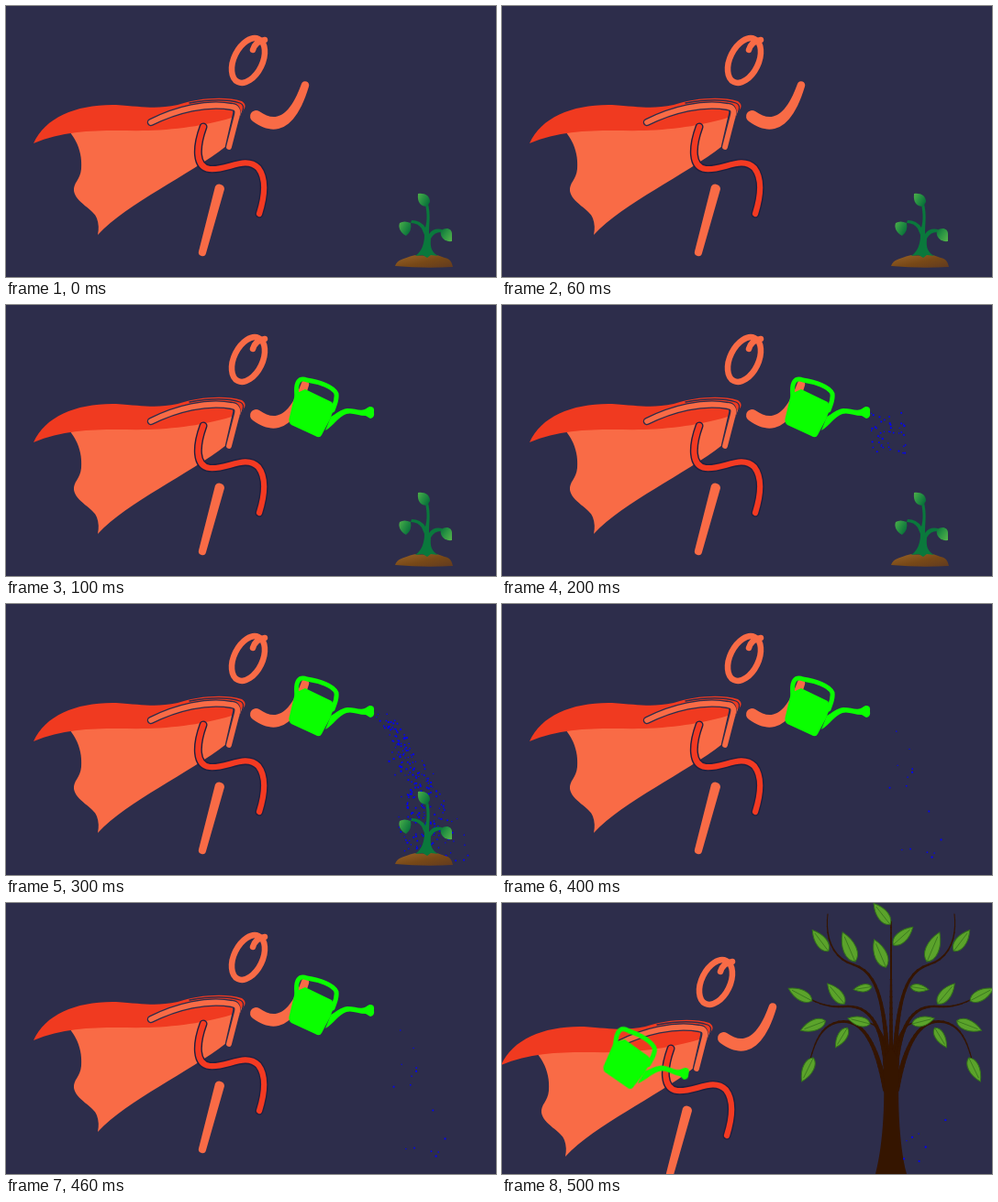
Recreate the animation shown at these times as an HTML page. Size 534x296 px, loop 0.6 s.

```html
<!DOCTYPE html>
<html lang="en">
<head>
<meta charset="utf-8">
<title>Watering hero</title>
<style>
  html, body { margin: 0; width: 100%; height: 100%; overflow: hidden; background: #2d2d4b; }
  svg { display: block; width: 100vw; height: 100vh; }
  .line { fill: none; stroke-linecap: round; stroke-linejoin: round; }
</style>
</head>
<body>
<svg viewBox="0 0 534 296">
  <defs>
    <linearGradient id="soil" x1="0" y1="0" x2="1" y2="1">
      <stop offset="0" stop-color="#9a6428"/><stop offset=".55" stop-color="#774817"/><stop offset="1" stop-color="#603a20"/>
    </linearGradient>
    <linearGradient id="blade" x1="0" y1="0" x2="1" y2=".6">
      <stop offset="0" stop-color="#50b04a"/><stop offset=".45" stop-color="#2a9443"/><stop offset="1" stop-color="#08703a"/>
    </linearGradient>
    <linearGradient id="bladeR" x1="1" y1=".8" x2="0" y2="0">
      <stop offset="0" stop-color="#50b04a"/><stop offset=".5" stop-color="#2a9443"/><stop offset="1" stop-color="#08703a"/>
    </linearGradient>
  </defs>

  <g id="tree">
    <g id="half">
      <g id="boughs" class="line" stroke="#351500"></g>
      <g id="leaves" fill="#5ba32b" stroke="#33701c"></g>
    </g>
    <use href="#half" transform="translate(848 0) scale(-1 1)"/>
    <path fill="#351500" d="M415 172C418 210 416 262 407 296H441C432 262 431 210 433 172L424 158Z"/>
    <g id="crown" fill="#5ba32b" stroke="#33701c"></g>
  </g>

  <g id="spray"></g>
  <g id="pour"></g>

  <g id="sapling">
    <path fill="url(#soil)" d="M424 284C426 277 434 276 439 274C447 270 453 274 459 272C466 270 472 273 478 275C484 276 486 280 487 285Q456 287 424 284Z"/>
    <path fill="#0a783c" d="M446 273C453 268 456 260 456 250L453 243Q449 237 441 237L442 234Q452 234 457 242C459 235 459 226 457 217L460 216C463 228 461 238 461 249Q466 242 475 244L476 247Q467 246 463 254C462 264 464 269 471 273L463 272L459 275L454 272Z"/>
    <path fill="url(#blade)" d="M449 205C456 204 462 207 462 214L459 219C452 219 448 215 449 205Z"/>
    <path fill="url(#blade)" d="M429 237Q434 234 441 237Q443 246 436 251C430 248 427 242 429 237Z"/>
    <path fill="url(#bladeR)" d="M474 245C480 241 486 243 486 249L486 257C479 258 472 253 474 245Z"/>
  </g>

  <g id="hero" fill="#f96b46">
    <path d="M57 124C72 138 84 154 82 178C81 190 73 193 74 202C76 215 96 222 99 232Q102 240 100 250C134 214 198 186 240 153L248 140L260 110L190 114L90 116Z"/>
    <path fill="#f03a20" d="M30 150C43 121 78 107 120 108C150 110 163 113 187 108C208 101 238 98 257 104Q262 107 260 112L249 121C225 129 190 135 155 136C120 137 72 132 30 150Z"/>
    <g class="line">
      <path d="M200 106C222 102 243 102 255 106Q260 108 258 114L246 149" stroke="#2d2d4b" stroke-width="1.300"/>
      <path d="M158 127C186 113 219 105 246 110Q253 111 251 119L243 154" stroke="#2d2d4b" stroke-width="8.500"/>
      <path d="M158 127C186 113 219 105 246 110Q254 111 252 119L243 154" stroke="#f96b46" stroke-width="5.800"/>
      <path d="M215 132C207 154 206 176 222 178C241 180 261 163 275 177C285 190 281 211 276 227" stroke="#1f2040" stroke-width="9"/>
      <path d="M215 132C207 154 206 176 222 178C241 180 261 163 275 177C285 190 281 211 276 227" stroke="#f43a22" stroke-width="6.200"/>
      <ellipse cx="264" cy="59.500" rx="15.500" ry="26" transform="rotate(26 264 59.500)" stroke="#f96b46" stroke-width="6.500"/>
      <path d="M269 48C271 41 275 38 282 37" stroke="#f96b46" stroke-width="6.500"/>
    </g>
    <path d="M228 197A5.500 5.500 0 0 1 238 200L218 270A4 4 0 0 1 210 268Z"/>
    <path d="M276 115C294 128 309 121 322 85A4 4 0 0 1 330 88C316 135 294 144 269 126A6.500 6.500 0 0 1 276 115Z"/>
  </g>

  <g id="can" fill="#0aff00">
    <path d="M315 97L326 92L355 106L358 112L353 125L344 142Q342 146 337 143L311 131Q307 128 309 122Z"/>
    <path class="line" stroke="#0aff00" stroke-width="5" d="M317 100C315 83 320 79 328 82C341 84 357 89 360 97C361 104 358 109 356 115"/>
    <path d="M348 137L354 122C360 119 364 114 372 113C380 113 386 116 391 114L396 111Q402 110 401 117Q402 123 397 124L392 121C384 121 377 117 371 119C362 122 357 132 348 137Z"/>
  </g>

  <g id="drips"></g>
  <g id="last"></g>
</svg>

<script>
const LOOP = 600, STEPS = 6;
const $ = id => document.getElementById(id);

function add(parent, tag, attrs) {
  const el = document.createElementNS("http://www.w3.org/2000/svg", tag);
  for (const k in attrs) el.setAttribute(k, attrs[k]);
  return parent.appendChild(el);
}

// A bough thins from root to tip
function bough(d, root = 6, tip = 1, parts = 30) {
  const guide = add($("boughs"), "path", { d, stroke: "none" });
  const len = guide.getTotalLength();
  const at = i => guide.getPointAtLength(len * i / parts);
  for (let i = 0; i < parts; i++) {
    const a = at(i), b = at(i + 1);
    add($("boughs"), "path", {
      d: `M${a.x} ${a.y}L${b.x} ${b.y}`,
      "stroke-width": tip + (root - tip) * (1 - i / parts) ** 1.3
    });
  }
}
bough("M424 210V20", 5);
bough("M421 190C418 95 405 74 382 67C360 60 352 38 355 12");
bough("M420 195C416 130 400 111 373 113C352 115 338 106 328 101");
bough("M418 204C406 142 388 126 366 130C345 135 340 157 335 174");
bough("M421 180C418 140 409 131 394 130", 4);

// Leaf by centre and tilt
function leaf(parent, x, y, tilt, len = 29) {
  const w = len * .27, h = len / 2;
  const g = add(parent, "g", { transform: `translate(${x} ${y}) rotate(${tilt})` });
  add(g, "path", { d: `M${-h} 0C${-h * .7} ${-w} ${h * .2} ${-w} ${h} 0C${h * .2} ${w} ${-h * .7} ${w} ${-h} 0Z` });
  add(g, "path", { d: `M${-h} 0H${h * .7}`, "stroke-width": .7 });
}
for (const spot of [
  [347, 41, 233], [378, 48, 247, 35], [325, 100, 208], [393, 93, 171, 20], [364, 99, 230],
  [339, 134, 159], [389, 129, 194, 25], [370, 147, 121, 25], [333, 182, 116]
]) leaf($("leaves"), ...spot);
leaf($("crown"), 414, 12, 232);
leaf($("crown"), 437, 36, -42);
leaf($("crown"), 412, 55, 247, 33);

// Water
let seed = 11;
const rnd = () => (seed = seed * 16807 % 2147483647) / 2147483647;
function drop(id, x, y) {
  const size = 1 + rnd();
  add($(id), "rect", { x, y, width: size, height: size, fill: "#00f" });
}
function scatter(id, count, x, y, w, h) {
  while (count--) drop(id, x + w * rnd(), y + h * rnd());
}
// Falls away from the spout and fans out
function shower(id, count, ease) {
  while (count--) {
    const t = rnd() ** ease, reach = 9 + 40 * t;
    drop(id, 404 + 64 * t ** .6 + (rnd() + rnd() - 1) * reach, 117 + 163 * t);
  }
}
scatter("spray", 46, 402, 117, 37, 44);
shower("pour", 270, .8);
shower("drips", 15, .5);
scatter("last", 7, 437, 235, 48, 48);

// One value per 100 ms step, held until the next
function steps(id, prop, values) {
  const frames = values.map((v, i) => ({ [prop]: v, offset: i / STEPS, easing: "step-end" }));
  frames.push({ [prop]: values[STEPS - 1], offset: 1 });
  $(id).animate(frames, { duration: LOOP, iterations: Infinity }).startTime = 0;
}
const shown = {
  sapling: "111100", can: "011111", spray: "001000", pour: "000100",
  drips: "000010", last: "000001", tree: "000001"
};
for (const id in shown) steps(id, "opacity", [...shown[id]].map(Number));

const lastPose = pose => [...Array(STEPS - 1).fill("none"), pose];
steps("hero", "transform", lastPose("translate(-31px, 27px)"));
steps("can", "transform", lastPose("translate(111px, 180.5px) rotate(10deg) translate(-309px, -127px)"));
</script>
</body>
</html>
```
